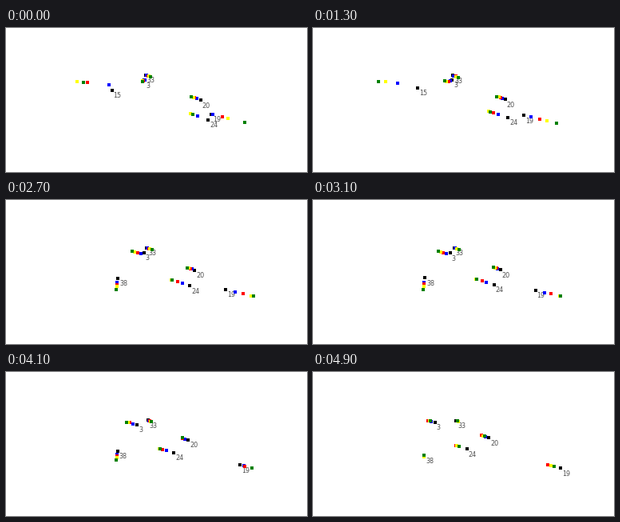
Animation, 377 px wide and 180 px high, one loop 5 s. Source, as a matplotlib script:

```python
import numpy as np
import matplotlib.pyplot as plt
from matplotlib.animation import FuncAnimation
from matplotlib.patches import Rectangle

W, H, DPI = 377, 180, 100
TICK, LOOP = 100, 5000
SIDE = 4
COLORS = ("black", "blue", "red", "yellow", "green")

# Start time of every step of the tracker, in ms
STARTS = (0, 100, 300, 1300, 1600, 1900, 2200, 2700, 3100,
          3300, 3600, 3900, 4100, 4500, 4700, 4800, 4900)
LAST = len(STARTS) - 1

fig = plt.figure(figsize=(W / DPI, H / DPI), dpi=DPI, facecolor="white")
ax = fig.add_axes([0, 0, 1, 1])
ax.set_xlim(0, W)
ax.set_ylim(H, 0)
ax.axis("off")


class Track:
    """A labelled object (black) and four predictions sliding along a path.

    Marks go from start to end; swell pushes each one ahead or back midway.
    """

    def __init__(self, name, path, start, end, swell=0, vertical=False,
                 first=0, last=LAST):
        self.path = np.array(path, float).T
        self.start, self.end = np.array(start), np.array(end)
        self.swell = np.array(swell)
        self.vertical = vertical
        self.first, self.last = first, last
        self.label = ax.text(0, 0, name, family="DejaVu Sans", size=8 * 72 / DPI,
                             color="#505050", va="baseline", zorder=1)
        self.marks = [
            ax.add_patch(Rectangle((0, 0), SIDE, SIDE, fc=c, lw=0,
                                   antialiased=False, zorder=2 + i))
            for i, c in enumerate(COLORS)]

    def places(self, step):
        u = (step - self.first) / (self.last - self.first)
        along = (self.start + (self.end - self.start) * u
                 + self.swell * np.sin(np.pi * u))
        across = np.interp(along, *self.path)
        pair = (across, along) if self.vertical else (along, across)
        return np.transpose(pair)

    def show(self, step):
        on = self.first <= step <= self.last
        spots = self.places(step)
        for mark, spot in zip(self.marks, spots):
            mark.set_xy(np.floor(spot - SIDE / 2 + 0.5))
            mark.set_visible(on)
        self.label.set_position(spots[0] + (2, 9.5))
        self.label.set_visible(on)


tracks = [
    Track("15", [(81, 66.5), (106, 68.7), (129, 71), (132.5, 77.5)],
          start=(132.5, 129, 102, 89, 97),
          end=(130.5, 98.5, 87, 91, 77.5), last=4),
    Track("38", [(97.5, 140), (103, 139), (112, 138.3)],
          start=(99, 103, 106, 108, 110),
          end=(104, 103.5, 104, 105.5, 103.5),
          swell=(-4, 0, 0, 1, 5), vertical=True, first=5),
    Track("33", [(174.5, 58.8), (183.5, 62.5)],
          start=(174.5, 176, 178, 178.5, 181),
          end=(179, 181, 181, 182, 180.5),
          swell=(0, -1, 0, 0, 2)),
    Track("3", [(144, 60.5), (169, 67.3), (174, 65)],
          start=(173, 174, 172, 171, 170.5),
          end=(152.5, 148, 144, 146, 147),
          swell=(9, 6, 5, 1, -2)),
    Track("20", [(211, 79), (243.5, 90)],
          start=(243.5, 238.5, 236, 235, 232),
          end=(220, 216, 211, 213, 214.5),
          swell=(3, 4, 6, 4, 3)),
    Track("24", [(179, 92), (192.5, 96), (204, 98.6), (253, 114.5)],
          start=(253, 239.5, 234, 230.5, 234),
          end=(192.5, 183, 179, 180, 183),
          swell=(4, 6, 5, -1, -4)),
    Track("19", [(257, 107.5), (277.5, 112.5), (317, 122)],
          start=(257, 259, 271, 277.5, 299),
          end=(310, 301.5, 293.5, 298, 301.5),
          swell=(-5, 10, 16, 21, 10)),
]


def draw(frame):
    step = np.searchsorted(STARTS, frame * TICK, side="right") - 1
    for track in tracks:
        track.show(step)
    return []


anim = FuncAnimation(fig, draw, frames=LOOP // TICK, interval=TICK,
                     init_func=lambda: draw(0), repeat=True, repeat_delay=0)
plt.show()
```
